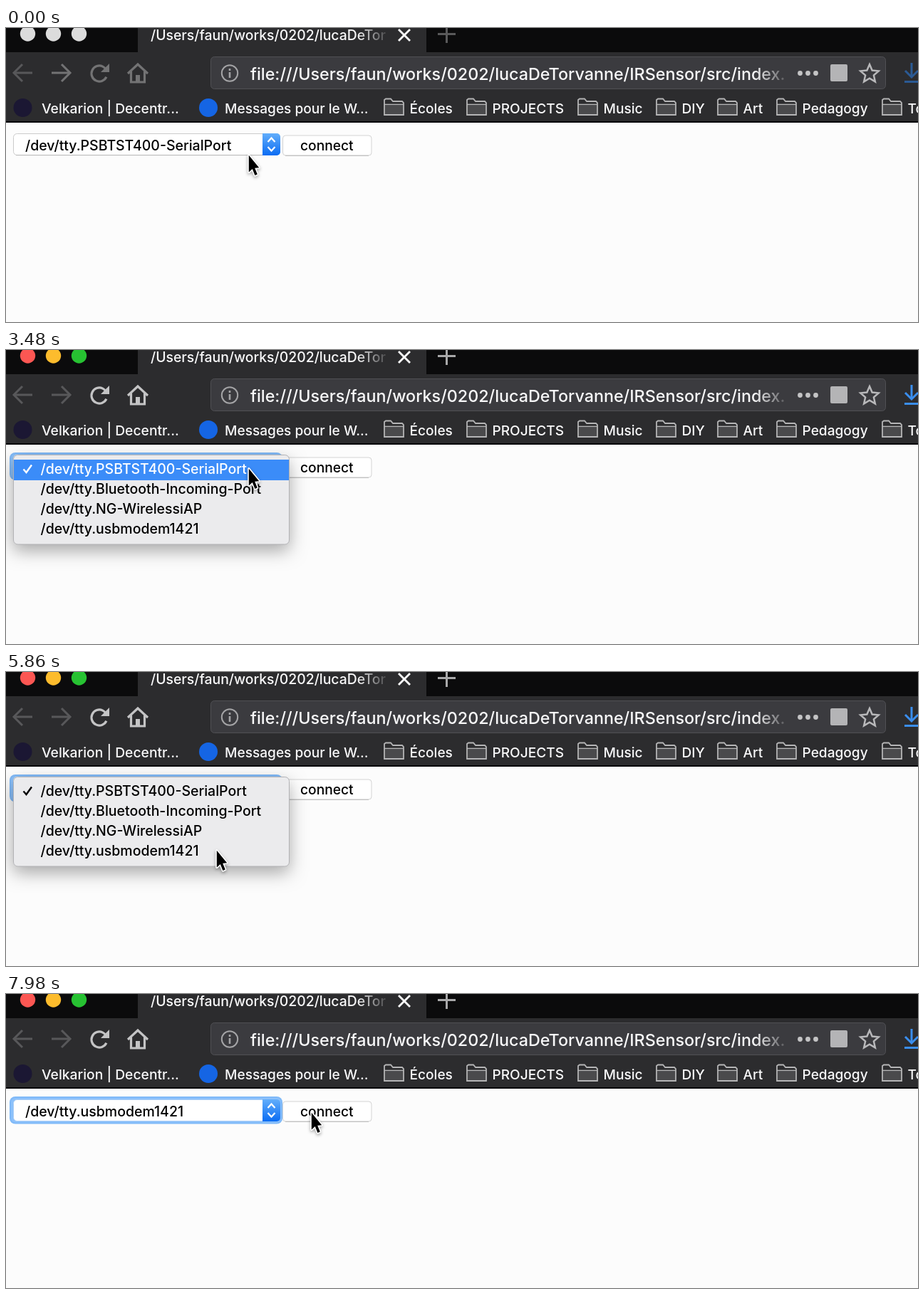
These frames come from a looping animation (1280 px wide and 413 px high, 8000 ms). An HTML page with a canvas:

```html
<!DOCTYPE html>
<html lang="en">
<head>
<meta charset="utf-8">
<title>Serial port picker</title>
<style>
html, body { margin: 0; width: 100%; height: 100%; overflow: hidden; background: #fcfcfc; }
canvas { display: block; width: 1280px; height: 413px; }
</style>
</head>
<body>
<canvas id="stage" width="1280" height="413"></canvas>
<script>
const LOOP = 8000;
const ctx = document.getElementById('stage').getContext('2d');
const PORTS = ['PSBTST400-SerialPort', 'Bluetooth-Incoming-Port', 'NG-WirelessiAP', 'usbmodem1421']
  .map(name => '/dev/tty.' + name);
const FOLDERS = [[530, 'Écoles'], [646, 'PROJECTS'], [802, 'Music'], [912, 'DIY'],
  [998, 'Art'], [1081, 'Pedagogy'], [1229, 'Tools']];
const BAR = '#2c2c2e', FIELD = '#3b3b3f', LIGHT = '#f9f9fa';

// pointer stops: time, x, y
const MOVES = [[0, 340, 178], [1100, 340, 178], [1500, 340, 166], [3700, 340, 166],
  [4340, 311, 217], [4850, 295, 250], [6950, 295, 250], [7850, 428, 166], [LOOP, 428, 166]];
const PRESSES = [[400, 620], [2120, 2360], [5580, 5760]];
const ACTIVE = 460, OPEN = 2120, BLINK = [5800, 5880], CLOSE = 5960, FADE = 160;

function text(str, x, y, size, color) {
  ctx.font = `500 ${size}px Inter, "Open Sans", sans-serif`;
  ctx.fillStyle = color;
  ctx.fillText(str, x, y);
}

function box(x, y, w, h, r, fill, stroke) {
  ctx.beginPath();
  ctx.roundRect(x, y, w, h, r);
  if (fill) { ctx.fillStyle = fill; ctx.fill(); }
  if (stroke) { ctx.strokeStyle = stroke; ctx.lineWidth = 1; ctx.stroke(); }
}

function disc(x, y, r, fill) {
  ctx.beginPath();
  ctx.arc(x, y, r, 0, Math.PI * 2);
  ctx.fillStyle = fill;
  ctx.fill();
}

function arc(x, y, r, from, to, color, width) {
  ctx.beginPath();
  ctx.arc(x, y, r, from, to);
  ctx.strokeStyle = color;
  ctx.lineWidth = width;
  ctx.stroke();
}

function trace(points, closed) {
  ctx.beginPath();
  points.forEach(([x, y]) => ctx.lineTo(x, y));
  if (closed) ctx.closePath();
}

function line(points, color, width, closed) {
  trace(points, closed);
  ctx.strokeStyle = color;
  ctx.lineWidth = width;
  ctx.stroke();
}

function fadeRight(x, y, w, h, color) {
  const g = ctx.createLinearGradient(x, 0, x + w, 0);
  g.addColorStop(0, color + '00');
  g.addColorStop(1, color);
  ctx.fillStyle = g;
  ctx.fillRect(x, y, w, h);
}

function arrow(x, dir, color) {
  line([[x - 13 * dir, 63], [x + 13 * dir, 63]], color, 3);
  line([[x + dir, 51], [x + 13 * dir, 63], [x + dir, 75]], color, 3);
}

function tabs(active) {
  ctx.fillStyle = '#0b0b0c';
  ctx.fillRect(0, 0, 1280, 34);
  ctx.fillStyle = BAR;
  ctx.fillRect(185, 0, 405, 34);
  ctx.fillRect(0, 34, 1280, 98);
  const lights = active ? ['#fc5753', '#fdbc2d', '#27c232'] : ['#dcdcdc', '#dcdcdc', '#dcdcdc'];
  lights.forEach((c, i) => disc(30.5 + 36 * i, 8, 10.7, c));
  text('/Users/faun/works/0202/lucaDeTor', 203, 17, 19.4, LIGHT);
  fadeRight(492, 0, 48, 30, BAR);
  ctx.fillStyle = BAR;
  ctx.fillRect(539, 0, 50, 30);
  line([[551, 2], [567, 18]], LIGHT, 2.8);
  line([[567, 2], [551, 18]], LIGHT, 2.8);
  const plus = active ? '#a9a9aa' : '#59595a';
  line([[606, 8.5], [631, 8.5]], plus, 3);
  line([[618.5, 0], [618.5, 21]], plus, 3);
}

function tools(active) {
  const icon = active ? '#c4c4c5' : '#737374';
  arrow(24, -1, '#58585a');
  arrow(77, 1, active ? '#58585a' : '#737374');

  arc(131, 64, 11, 0.45, Math.PI * 2 - 0.7, icon, 3.2);
  trace([[145, 50], [145, 62], [133, 62]]);
  ctx.fillStyle = icon;
  ctx.fill();

  line([[171, 64], [185, 51], [199, 64]], icon, 3.2);
  line([[175.5, 61], [175.5, 76], [194.5, 76], [194.5, 61]], icon, 3.2);
  ctx.fillStyle = icon;
  ctx.fillRect(182, 66, 6, 10);

  box(287.5, 40.5, 947, 45, 5, FIELD, '#505054');
  arc(314, 63.5, 11.2, 0, Math.PI * 2, '#a4a4a6', 2);
  ctx.fillStyle = '#a4a4a6';
  ctx.fillRect(312.7, 62, 2.6, 8);
  ctx.fillRect(312.7, 57, 2.6, 3);
  text('file:///Users/faun/works/0202/lucaDeTorvanne/IRSensor/src/index.', 343, 72.5, 23.3, LIGHT);
  fadeRight(1050, 44, 52, 38, FIELD);
  ctx.fillStyle = FIELD;
  ctx.fillRect(1101, 44, 60, 38);
  for (let i = 0; i < 3; i++) disc(1114.5 + 11 * i, 63.5, 3.4, '#c4c4c5');
  box(1157, 51, 24, 24, 2, '#b4b4b6');

  const star = [];
  for (let i = 0; i < 10; i++) {
    const r = i % 2 ? 6.2 : 13.4, a = i * Math.PI / 5 - Math.PI / 2;
    star.push([1212 + r * Math.cos(a), 64.5 + r * Math.sin(a)]);
  }
  line(star, '#b9b9bb', 2.5, true);

  const blue = active ? '#3a8eee' : '#2b5a94';
  line([[1271, 49], [1271, 69]], blue, 3);
  line([[1262, 60], [1271, 69], [1280, 60]], blue, 3);
  line([[1261, 75.5], [1284, 75.5]], blue, 3);
}

function bookmarks() {
  disc(23.5, 112, 13, '#1b1733');
  text('Velkarion | Decentr...', 50, 119.5, 19.3, LIGHT);
  disc(284, 112, 13, '#1565e4');
  text('Messages pour le W...', 307, 119.5, 19.1, LIGHT);
  for (const [x, name] of FOLDERS) {
    line([[x + 1, 122], [x + 1, 101], [x + 3, 99.5], [x + 10, 99.5], [x + 13, 103], [x + 26, 103],
      [x + 28, 105], [x + 28, 122]], '#b5b5b6', 1.8, true);
    line([[x + 1, 107.5], [x + 28, 107.5]], '#b5b5b6', 1.6);
    ctx.fillStyle = '#4a4a4c';
    ctx.fillRect(x + 2, 108.5, 25, 12.5);
    text(name, x + 36.5, 119.5, 19.1, LIGHT);
  }
  ctx.fillStyle = '#08080a';
  ctx.fillRect(0, 131, 1280, 2);
}

function form(focused, value) {
  box(388.5, 151, 124.5, 28, 4, '#ffffff', '#d3d3d3');
  line([[392, 179.3], [509, 179.3]], '#bcbcbc', 1);
  if (focused) {
    box(5, 144, 383, 38.5, 8, '#7fb9f8');
    box(7, 146, 379, 34.5, 6, '#8cc1fb');
  }
  box(10.5, 148.5, 374, 30, 5, '#ffffff', focused ? '#a9cdf5' : '#cbcbcb');
  if (!focused) line([[14, 178.7], [360, 178.7]], '#b9b9b9', 1);
  const g = ctx.createLinearGradient(0, 148, 0, 179);
  g.addColorStop(0, '#62aefb');
  g.addColorStop(1, '#0a6cf3');
  box(360, 148, 25, 31, [0, 5, 5, 0], g);
  line([[367.5, 160], [372.5, 154.5], [377.5, 160]], '#fff', 2.2);
  line([[367.5, 167], [372.5, 172.5], [377.5, 167]], '#fff', 2.2);
  text(value, 27, 171.5, 19.5, '#000');
  text('connect', 413, 171.5, 19.2, '#000');
}

function menu(hot, alpha) {
  ctx.save();
  ctx.globalAlpha = alpha;
  ctx.save();
  ctx.shadowColor = 'rgba(0,0,0,0.34)';
  ctx.shadowBlur = 24;
  ctx.shadowOffsetY = 9;
  box(10, 147, 387.5, 126, 6, '#ebebed');
  ctx.restore();
  box(10.5, 147.5, 387, 125.5, 6, '#ebebed', '#b2b2b5');
  if (hot >= 0) {
    ctx.fillStyle = '#3b8cf8';
    ctx.fillRect(11, 154 + 28 * hot, 386, 29);
  }
  PORTS.forEach((p, i) => text(p, 48.5, 174 + 28 * i, 19.5, i === hot ? '#fff' : '#000'));
  line([[24.5, 167.5], [28.5, 172], [36, 161.5]], hot === 0 ? '#fff' : '#000', 2.4);
  ctx.restore();
}

function pointerAt(t) {
  let i = 0;
  while (i < MOVES.length - 2 && t >= MOVES[i + 1][0]) i++;
  const [t0, x0, y0] = MOVES[i], [t1, x1, y1] = MOVES[i + 1];
  const p = (t - t0) / (t1 - t0), e = p * p * (3 - 2 * p);
  return [x0 + (x1 - x0) * e, y0 + (y1 - y0) * e];
}

function pointer(x, y) {
  ctx.save();
  ctx.translate(x, y);
  trace([[0.8, 0.8], [0.8, 24.5], [5.8, 20], [9.4, 29], [12.8, 27.6], [9.2, 18.8], [15.2, 18.2]], true);
  ctx.lineJoin = 'round';
  ctx.shadowColor = 'rgba(0,0,0,0.35)';
  ctx.shadowBlur = 4;
  ctx.shadowOffsetY = 2;
  ctx.strokeStyle = '#fff';
  ctx.lineWidth = 3.2;
  ctx.stroke();
  ctx.shadowColor = 'transparent';
  ctx.fillStyle = '#000';
  ctx.fill();
  ctx.restore();
}

function ring(x, y) {
  arc(x, y + 2, 37.6, 0, Math.PI * 2, '#fff', 2);
  arc(x, y + 2, 39.3, 0, Math.PI * 2, '#000', 2.2);
}

function draw(t) {
  const active = t >= ACTIVE;
  const [x, y] = pointerAt(t);
  ctx.fillStyle = '#fcfcfc';
  ctx.fillRect(0, 0, 1280, 413);
  tabs(active);
  tools(active);
  bookmarks();
  form(t >= OPEN, PORTS[t >= CLOSE ? 3 : 0]);
  if (t >= OPEN && t < CLOSE + FADE) {
    const blink = t >= BLINK[0] && t < BLINK[1];
    const hot = blink ? -1 : Math.max(0, Math.min(3, Math.floor((y - 154) / 28)));
    menu(hot, Math.min(1, 1 - (t - CLOSE) / FADE));
  }
  pointer(x, y);
  if (PRESSES.some(([a, b]) => t >= a && t < b)) ring(x, y);
}

const start = performance.now();
function tick() {
  draw((performance.now() - start) % LOOP);
  requestAnimationFrame(tick);
}
tick();
</script>
</body>
</html>
```
